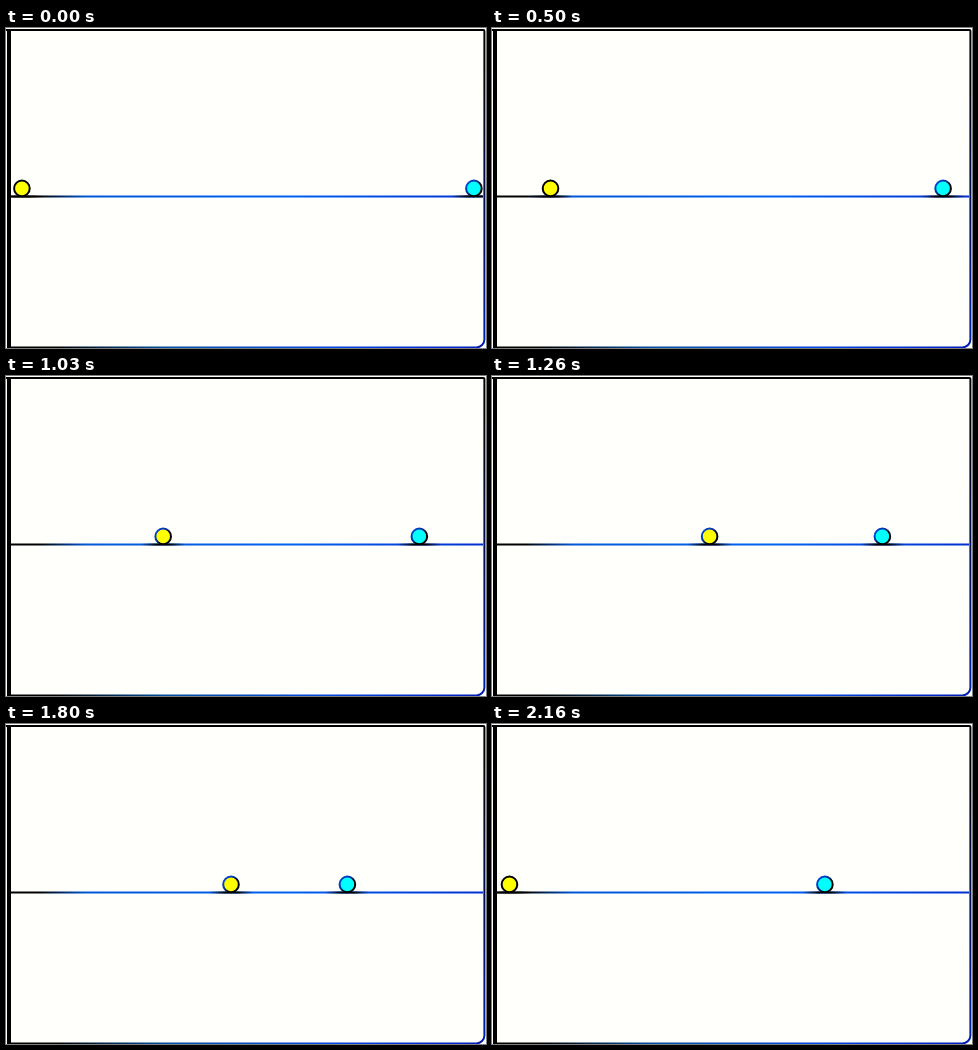
These frames come from a looping animation (480 by 320 pixels, 2.2 s). An HTML page with a canvas:

```html
<!DOCTYPE html>
<html>
<head>
<meta charset="utf-8">
<style>
html, body { margin: 0; width: 100%; height: 100%; overflow: hidden; background: #fffffc; }
canvas { display: block; }
</style>
</head>
<body>
<canvas id="stage" width="480" height="320"></canvas>
<script>
const ctx = document.getElementById('stage').getContext('2d');
const LOOP = 2200, FPS = 30, HIT = 1.625, FLOOR = 168.4;
const BLUE = '#0048e0';

function fade(x0, y0, x1, y1, ...stops) {
  const g = ctx.createLinearGradient(x0, y0, x1, y1);
  stops.forEach(([at, color]) => g.addColorStop(at, color));
  return g;
}

function line(color, width, ...pts) {
  ctx.strokeStyle = color;
  ctx.lineWidth = width;
  ctx.beginPath();
  pts.forEach(([x, y]) => ctx.lineTo(x, y));
  ctx.stroke();
}

function frame() {
  ctx.fillStyle = '#fffffc';
  ctx.fillRect(0, 0, 480, 320);
  line('#000', 4, [3, 1], [3, 320]);
  line('#000', 2, [0, 2], [477, 2]);
  // right and bottom edges with the rounded corner
  ctx.strokeStyle = fade(0, 319, 478, 40, [0, '#000'], [0.08, '#000'], [0.25, '#0050a0'], [0.5, BLUE], [0.72, '#0020c0'], [1, '#000']);
  ctx.lineWidth = 2;
  ctx.beginPath();
  ctx.moveTo(477, 2);
  ctx.arcTo(478.4, 2, 478.4, 4, 1);
  ctx.arcTo(478.4, 319.4, 468, 319.4, 8);
  ctx.lineTo(2, 319.4);
  ctx.stroke();
}

function ball(x, fill, rim) {
  line(fade(x - 22, 0, x + 22, 0, [0, '#0000'], [0.35, '#000'], [0.65, '#000'], [1, '#0000']),
    2, [Math.max(5, x - 22), FLOOR], [Math.min(477, x + 22), FLOOR]);
  ctx.fillStyle = fill;
  ctx.strokeStyle = rim;
  ctx.lineWidth = 2;
  ctx.beginPath();
  ctx.arc(x, 160.4, 7.8, 0, 7);
  ctx.fill();
  ctx.stroke();
}

function rim(x) {
  return fade(x - 7, 154, x + 7, 166, [0, BLUE], [0.4, '#0030a0'], [0.65, '#000']);
}

function draw(now) {
  const t = Math.floor((now % LOOP + 6.8) * FPS / 1000) % 66 / FPS;
  const hit = t > HIT;
  // accelerate together, then rebound at steady speed
  const yellow = hit ? 225 - 566 * (t - 1.8) : 15.9 + 37 * t + 96.5 * t * t;
  const cyan = hit ? 341.4 - 23.2 * (t - 1.8) : 467.9 - 15.6 * t - 36 * t * t;
  frame();
  line(fade(5, 0, 477, 0, [0, '#000'], [0.06, '#000'], [0.16, '#0058d8'], [0.6, '#0060f0'], [1, '#0030d0']),
    2, [5, FLOOR], [477, FLOOR]);
  ball(yellow, '#ff0', yellow < 65 ? '#000' : rim(yellow));
  ball(cyan, '#0ff', rim(cyan));
}

const start = performance.now();
function tick() {
  draw(performance.now() - start);
  requestAnimationFrame(tick);
}
tick();
</script>
</body>
</html>
```
